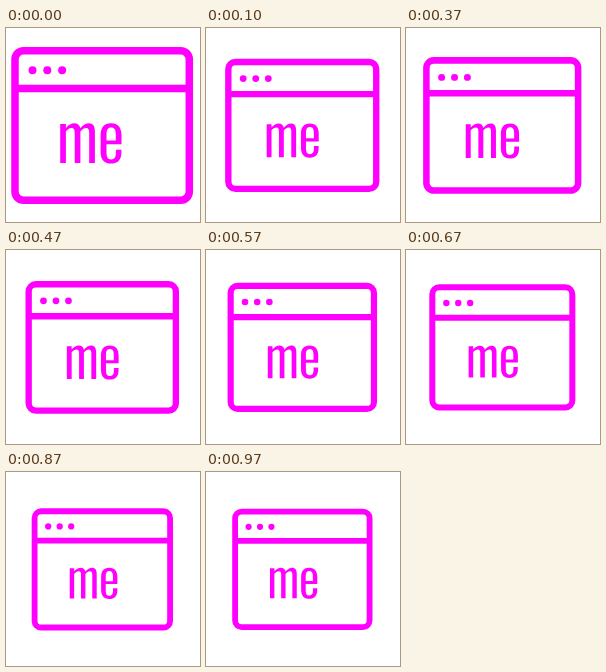
Write an HTML page that moves like this. It is 194x194 px and loops after 1000 ms.

```html
<!DOCTYPE html>
<html lang="en">
<head>
<meta charset="utf-8">
<title>Window heartbeat</title>
<style>
  html, body { margin: 0; width: 100%; height: 100%; overflow: hidden; background: #fff; }
  svg { display: block; width: 100%; height: 100%; }
</style>
</head>
<body>
<svg viewBox="0 0 194 194" role="img" aria-label="me">
  <g id="icon" fill="#f0f">
    <g fill="none" stroke="#f0f" stroke-width="7.5">
      <rect x="9" y="22.75" width="174.3" height="149.5" rx="8.5"/>
      <path d="M9 60.6H183.3"/>
    </g>
    <circle cx="26.5" cy="42.3" r="4"/>
    <circle cx="41.3" cy="42.3" r="4"/>
    <circle cx="56.1" cy="42.3" r="4"/>
    <!-- condensed lettering: m, e -->
    <path d="M54.2 96H59.9V100C62.5 96.8 65.5 95.3 68.3 95.3C71.5 95.3 73.6 97 74.4 100.3
      C77 97 80 95.3 83 95.3C87 95.3 88.9 98 88.9 103.5V135H83.2V104.5
      C83.2 101.5 82.3 100 80.2 100C78.3 100 76.4 101.2 74.4 103.4V135H68.7V104.5
      C68.7 101.5 67.8 100 65.7 100C63.8 100 61.8 101.2 59.9 103.3V135H54.2Z"/>
    <path fill-rule="evenodd" d="M105 95.3C112.5 95.3 115.5 100 115.5 107.5V116.3H100.5V124.5
      C100.5 129.5 102 131.4 105.1 131.4C108.5 131.4 109.9 129.2 109.9 125V121.8H115.4V124.5
      C115.4 131.5 112 135.6 105 135.6C97.8 135.6 94.6 131.2 94.6 123.5V107.5
      C94.6 99.7 97.8 95.3 105 95.3Z
      M100.5 112.6H109.8V106.5C109.8 102 108.6 99.5 105.1 99.5C101.8 99.5 100.5 102 100.5 106.5Z"/>
  </g>
</svg>
<script>
  const icon = document.getElementById('icon');
  const LOOP = 1000, FPS = 30, CENTER = 97, SECOND_BEAT = 0.35;

  // Two beats: a sharp drop from full size, then a softer one that eases out.
  function scaleAt(t) {
    if (t < SECOND_BEAT) return 0.805 + 0.195 * Math.exp(-15 * t);
    const u = (t - SECOND_BEAT) / (1 - SECOND_BEAT);
    return 0.771 + 0.104 * Math.pow(1 - u, 1.75);
  }

  function draw(ms) {
    // Steps start on 10 ms marks, so allow for the rounding.
    const step = Math.min(FPS - 1, Math.floor((ms % LOOP + 4) * FPS / 1000));
    const s = scaleAt(step / FPS);
    icon.setAttribute('transform',
      `translate(${CENTER} ${CENTER}) scale(${s}) translate(${-CENTER} ${-CENTER})`);
  }

  const start = performance.now();
  function tick() {
    draw(performance.now() - start);
    requestAnimationFrame(tick);
  }
  tick();
</script>
</body>
</html>
```
